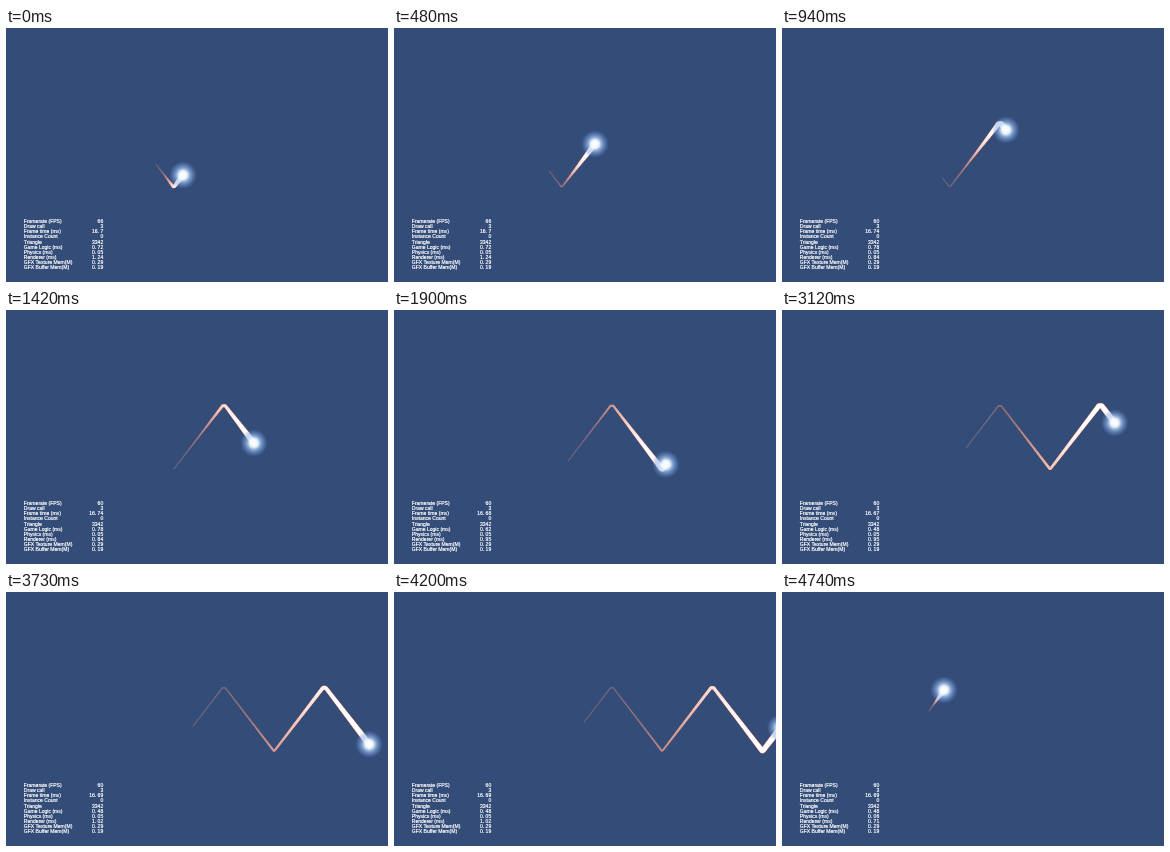
An HTML page with a canvas for the animation above (4.81 s loop, 382x254 px).

```html
<!DOCTYPE html>
<html lang="en">
<head>
<meta charset="utf-8">
<title>Zigzag trail</title>
<style>
  html, body { margin: 0; width: 100%; height: 100%; overflow: hidden; background: rgb(51, 76, 120); }
  canvas { display: block; width: 382px; height: 254px; }
</style>
</head>
<body>
<canvas id="stage" width="382" height="254"></canvas>
<script>
const ctx = document.getElementById('stage').getContext('2d');
const LOOP = 4810, RESET = 4440, SPEED = 0.0499;
const BG = [51, 76, 120], EMBER = [236, 148, 128], WHITE = [255, 255, 255];

// Time and x of the fading end of the trail
const TAIL = [[0, 150], [940, 161], [1900, 174], [2570, 180], [3120, 184], [3730, 187], [RESET, 192]];

const LABELS = ['Framerate (FPS)', 'Draw call', 'Frame time (ms)', 'Instance Count', 'Triangle',
  'Game Logic (ms)', 'Physics (ms)', 'Renderer (ms)', 'GFX Texture Mem(M)', 'GFX Buffer Mem(M)'];

// Start time, frame rate, frame time, logic, physics, renderer
const STATS = [
  [0, '66', '16.7', '0.72', '0.05', '1.24'],
  [500, '60', '16.74', '0.78', '0.05', '0.84'],
  [1450, '60', '16.68', '0.62', '0.05', '0.95'],
  [2240, '60', '16.69', '0.48', '0.05', '0.99'],
  [2850, '60', '16.67', '0.48', '0.05', '0.95'],
  [3430, '60', '16.69', '0.48', '0.05', '1.02'],
  [4240, '60', '16.69', '0.48', '0.06', '0.71']
];

const clamp = (v, lo, hi) => Math.min(hi, Math.max(lo, v));
const mix = (a, b, k) => a.map((v, i) => v + (b[i] - v) * k);
const css = c => `rgb(${c.map(Math.round).join(',')})`;
const smooth = (lo, hi, v) => {
  const k = clamp((v - lo) / (hi - lo), 0, 1);
  return k * k * (3 - 2 * k);
};

function lerpKeys(keys, t) {
  const i = keys.findIndex(k => k[0] > t);
  const [t0, a] = keys[i - 1], [t1, b] = keys[i];
  return a + (b - a) * (t - t0) / (t1 - t0);
}

// Triangle wave with slightly flattened corners
function zigzag(x) {
  const half = 50.2;
  const phase = (((x - 217.9) % (2 * half)) + 2 * half) % (2 * half);
  return clamp(94 + 1.3 * Math.min(phase, 2 * half - phase), 95.8, 158.6);
}

function pose(t) {
  if (t < RESET) return { tail: lerpKeys(TAIL, t), head: 177 + SPEED * t, path: zigzag };
  return { tail: 147, head: 147 + SPEED * (t - RESET), path: x => 119 - (x - 147) * 1.4 };
}

function drawTrail({ tail, head, path }) {
  const count = Math.max(1, Math.ceil((head - tail) * 1.5));
  const at = u => tail + (head - tail) * u;
  const pass = (width, color) => {
    for (let i = 0; i < count; i++) {
      const u = (i + 0.5) / count, x0 = at(i / count), x1 = at((i + 1) / count);
      ctx.lineWidth = width(u);
      ctx.strokeStyle = css(color(u));
      ctx.beginPath();
      ctx.moveTo(x0, path(x0));
      ctx.lineTo(x1, path(x1));
      ctx.stroke();
    }
  };
  const edge = u => mix(BG, EMBER, 0.3 + 0.7 * smooth(0, 0.75, u));
  ctx.lineCap = 'round';
  pass(u => 1 + 5.2 * u * u, edge);
  pass(u => 0.5 + 4.6 * u * u, u => mix(edge(u), WHITE, smooth(0.3, 0.85, u)));
}

function drawGlow(x, y) {
  const r = 14;
  const halo = ctx.createRadialGradient(x, y, 0, x, y, r);
  halo.addColorStop(0, 'rgba(255,255,255,1)');
  halo.addColorStop(0.3, 'rgba(242,249,255,.95)');
  halo.addColorStop(0.5, 'rgba(172,207,250,.68)');
  halo.addColorStop(0.78, 'rgba(115,155,220,.38)');
  halo.addColorStop(1, 'rgba(90,130,200,0)');
  ctx.fillStyle = halo;
  ctx.beginPath();
  ctx.arc(x, y, r, 0, Math.PI * 2);
  ctx.fill();
}

function label(text, x, y) {
  ctx.fillText(text, x, y);
  ctx.strokeText(text, x, y);
}

function drawStats(t) {
  const [, fps, frame, logic, physics, renderer] = STATS.filter(s => s[0] <= t).pop();
  const values = [fps, '3', frame, '0', '3342', logic, physics, renderer, '0.29', '0.19'];
  const cell = 2.81;
  ctx.font = '5.05px "Liberation Sans", Arial, sans-serif';
  ctx.fillStyle = ctx.strokeStyle = '#fff';
  ctx.lineWidth = 0.2;
  LABELS.forEach((text, i) => {
    const y = 195 + i * 5.13;
    label(text, 17.8, y);
    [...values[i]].forEach((ch, k) => label(ch, 97.2 - (values[i].length - k) * cell, y));
  });
}

function draw(t) {
  ctx.fillStyle = css(BG);
  ctx.fillRect(0, 0, 382, 254);
  const p = pose(t);
  drawTrail(p);
  drawGlow(p.head, p.path(p.head));
  drawStats(t);
}

function tick() {
  draw(performance.now() % LOOP);
  requestAnimationFrame(tick);
}
tick();
</script>
</body>
</html>
```
